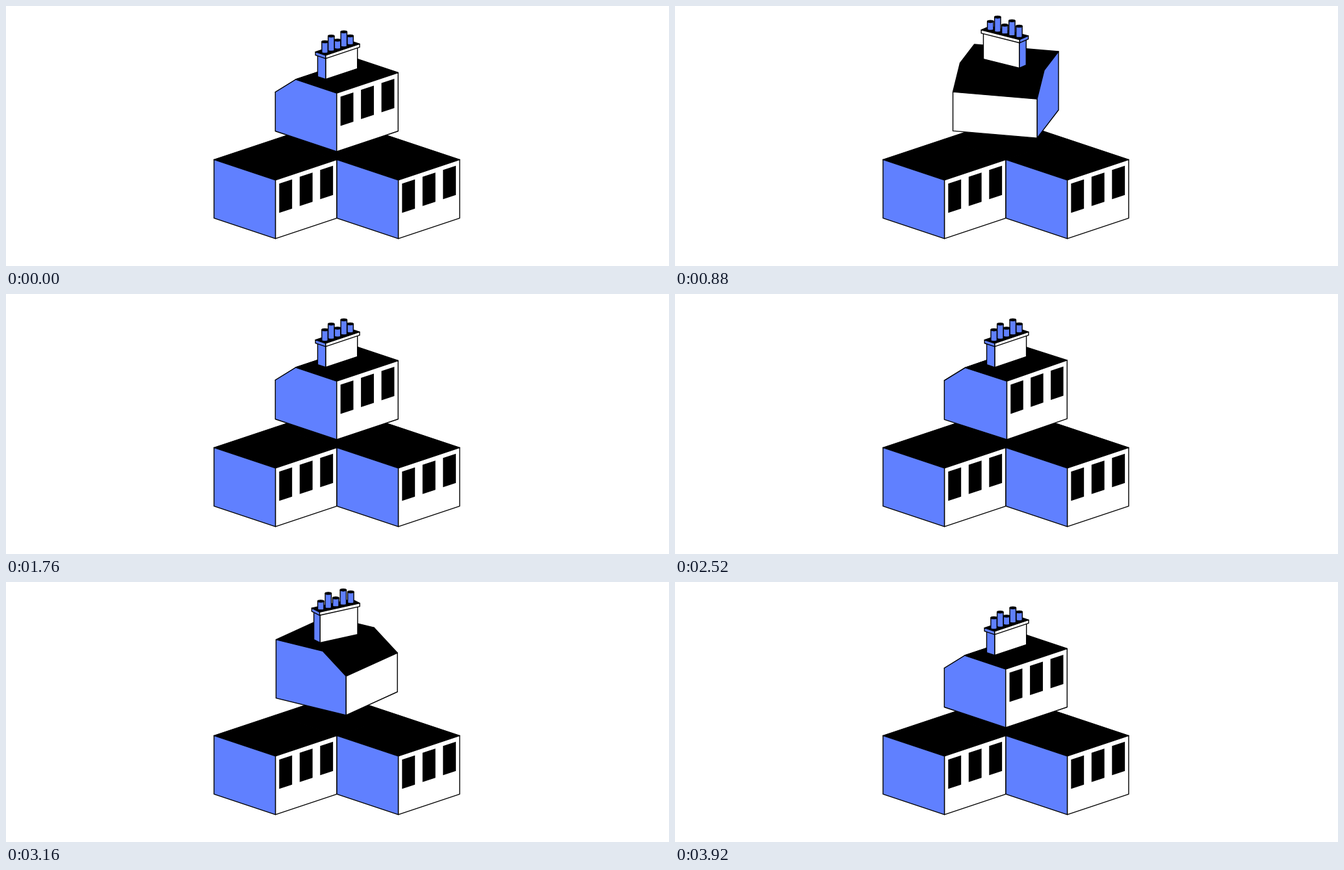
These frames come from a looping animation (1020 by 400 pixels, 4240 ms). An HTML page with a canvas:

```html
<!DOCTYPE html>
<html lang="en">
<head>
<meta charset="utf-8">
<title>Hopping house</title>
<style>
html, body { margin: 0; width: 100%; height: 100%; overflow: hidden; background: #fff; }
canvas { display: block; width: 1020px; height: 400px; }
</style>
</head>
<body>
<canvas id="stage" width="1020" height="400"></canvas>
<script>
const ctx = document.getElementById('stage').getContext('2d');
const BLUE = '#6080ff', WHITE = '#fff', BLACK = '#000';
const LOOP = 4240, STEP = 40, SECOND_HOP = 2160;
const HALF = 66.8, WALL = 90, EAVE = 60, RIDGE = -HALF / 3;
const CX = 508.8, CY = 192.5;

// Degrees turned: eased ends around a steady middle stretch.
const HOPS = [
  { house: [[320, 0], [880, 120.7], [1360, 298.3], [1760, 360]],
    stack: [[320, 0], [880, 98.1], [1360, 276.1], [1760, 360]] },
  { house: [[320, 0], [680, 73], [1280, 290.2], [1760, 360]],
    stack: [[320, 0], [680, 51.6], [1280, 270.6], [1760, 360]] }
];

function turn(keys, t) {
  if (t <= keys[0][0] || t >= keys[3][0]) return 0;
  const speed = (keys[2][1] - keys[1][1]) / (keys[2][0] - keys[1][0]);
  const slopes = [0, speed, speed, 0];
  const i = t < keys[1][0] ? 0 : t < keys[2][0] ? 1 : 2;
  const [t0, a] = keys[i], [t1, b] = keys[i + 1];
  const d = t1 - t0, p = (t - t0) / d, q = 1 - p;
  return a * (1 + 2 * p) * q * q + b * p * p * (3 - 2 * p)
    + d * (slopes[i] * p * q * q - slopes[i + 1] * p * p * q);
}

function hop(t, start, height) {
  const p = (t - start) / 1240;
  return p <= 0 || p >= 1 ? 0 : height * Math.sin(Math.PI * p) ** 2;
}

// Ground frame: u runs across the house, v along its window wall.
function makeFrame(x, y, degrees) {
  const a = (45 - degrees) * Math.PI / 180;
  const c = Math.cos(a), s = Math.sin(a);
  return { c, s, at: (u, v, z) => [x + u * c + v * s, y + (u * s - v * c) / 3 - z] };
}

function poly(points, fill, stroke = true) {
  ctx.beginPath();
  points.forEach(p => ctx.lineTo(p[0], p[1]));
  ctx.closePath();
  ctx.fillStyle = fill;
  ctx.fill();
  if (stroke) ctx.stroke();
}

function sideWall(f, u, v0, v1, z0, z1, fill, stroke) {
  poly([f.at(u, v0, z0), f.at(u, v1, z0), f.at(u, v1, z1), f.at(u, v0, z1)], fill, stroke);
}

function topFace(f, u0, u1, v0, v1, z0, z1 = z0) {
  poly([f.at(u0, v0, z0), f.at(u1, v0, z1), f.at(u1, v1, z1), f.at(u0, v1, z0)], BLACK);
}

function windows(f) {
  for (let i = -1; i <= 1; i++) {
    const mid = i * HALF * 2 / 3, w = HALF * 0.21;
    sideWall(f, HALF, mid - w, mid + w, 37.5, 82.5, BLACK, false);
  }
}

function block(f, hu, hv, z0, z1, dv = 0) {
  const v0 = dv - hv, v1 = dv + hv;
  topFace(f, -hu, hu, v0, v1, z1);
  sideWall(f, f.s > 0 ? hu : -hu, v0, v1, z0, z1, WHITE);
  const v = f.c > 0 ? v0 : v1;
  poly([f.at(-hu, v, z0), f.at(hu, v, z0), f.at(hu, v, z1), f.at(-hu, v, z1)], BLUE);
}

function house(f) {
  topFace(f, -HALF, RIDGE, -HALF, HALF, EAVE, WALL);
  topFace(f, RIDGE, HALF, -HALF, HALF, WALL);
  const v = f.c > 0 ? -HALF : HALF;
  poly([f.at(-HALF, v, 0), f.at(-HALF, v, EAVE), f.at(RIDGE, v, WALL),
    f.at(HALF, v, WALL), f.at(HALF, v, 0)], BLUE);
  if (f.s > 0) {
    sideWall(f, HALF, -HALF, HALF, 0, WALL, WHITE);
    windows(f);
  } else {
    sideWall(f, -HALF, -HALF, HALF, 0, EAVE, WHITE);
  }
}

function pot(x, y, h) {
  const r = 4.7, ry = r / 3;
  ctx.beginPath();
  ctx.ellipse(x, y, r, ry, 0, Math.PI, 0, true);
  ctx.lineTo(x + r, y - h);
  ctx.lineTo(x - r, y - h);
  ctx.closePath();
  ctx.fillStyle = BLUE;
  ctx.fill();
  ctx.stroke();
  ctx.beginPath();
  ctx.ellipse(x, y - h, r, ry, 0, 0, Math.PI * 2);
  ctx.fillStyle = BLACK;
  ctx.fill();
  ctx.stroke();
}

function chimney(f, roof, lift) {
  const dv = 1.8, top = 128 + lift;
  block(f, 8.7, 34.6, roof, top - 5, dv);
  block(f, 11, 37, top - 5, top, dv);
  [16, 21.5, 12, 21.5, 12]
    .map((h, i) => [...f.at(0, dv + (i - 2) * 13.8, top), h])
    .sort((a, b) => a[1] - b[1])
    .forEach(p => pot(...p));
}

function draw(t) {
  const second = t >= SECOND_HOP;
  const keys = HOPS[second ? 1 : 0];
  const local = second ? t - SECOND_HOP : t;
  const lift = hop(local, 400, 18.7);

  ctx.fillStyle = WHITE;
  ctx.fillRect(0, 0, 1020, 400);
  ctx.strokeStyle = BLACK;
  ctx.lineWidth = 1.4;
  ctx.lineJoin = 'round';

  topFace(makeFrame(509, 294.8, 0), -HALF, HALF, -HALF, HALF, WALL);
  for (const x of [414.5, 603.5]) {
    const f = makeFrame(x, 326.3, 0);
    block(f, HALF, HALF, 0, WALL);
    windows(f);
  }
  house(makeFrame(CX, CY - lift, turn(keys.house, local)));
  chimney(makeFrame(CX, CY + 0.5, turn(keys.stack, local)), WALL + lift, hop(local, 455, 30));
}

const start = performance.now();
function tick() {
  const ms = Math.max(0, performance.now() - start) % LOOP;
  draw(Math.floor(ms / STEP) * STEP);
  requestAnimationFrame(tick);
}
tick();
</script>
</body>
</html>
```
